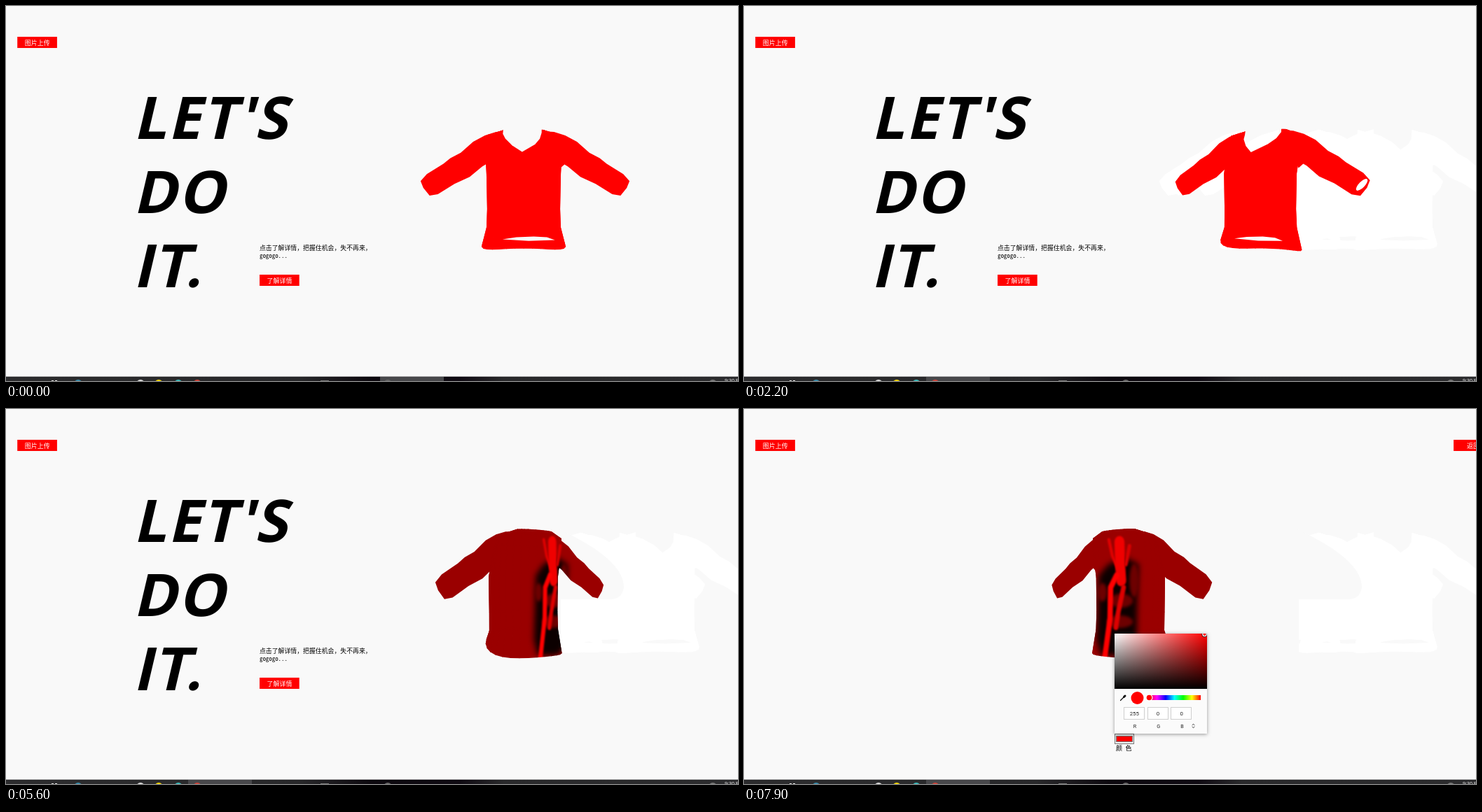
Recreate the animation shown at these times as an HTML page with a canvas. Size 1045 px wide and 536 px high, loop 8 s.

```html
<!DOCTYPE html>
<html lang="zh">
<head>
<meta charset="utf-8">
<title>Let's do it</title>
<style>
html, body { margin: 0; width: 100%; height: 100%; overflow: hidden; background: #f9f9f9; }
canvas { display: block; }
</style>
</head>
<body>
<canvas id="stage" width="1045" height="536"></canvas>
<script>
const W = 1045, H = 536, LOOP = 8000, STEP = 100;
const RED = '#f00', PAGE = '#f9f9f9';
const KAI = '"Noto Sans Mono CJK SC", "Noto Sans CJK SC", "Noto Sans CJK", sans-serif';
const UI = '"Noto Sans", "Noto Sans CJK SC", "Noto Sans CJK", sans-serif';
const g = document.getElementById('stage').getContext('2d');
const layer = document.createElement('canvas');
layer.width = W;
layer.height = H;
const s = layer.getContext('2d');

function rect(x, y, w, h, fill, line) {
  g.fillStyle = fill;
  g.fillRect(x, y, w, h);
  if (line) {
    g.strokeStyle = line;
    g.lineWidth = 1;
    g.strokeRect(x + 0.5, y + 0.5, w - 1, h - 1);
  }
}

function disc(x, y, r, fill) {
  g.fillStyle = fill;
  g.beginPath();
  g.arc(x, y, r, 0, 7);
  g.fill();
}

function text(str, x, y, size, fill = '#000', align = 'left', family = UI) {
  g.font = `${size}px ${family}`;
  g.textAlign = align;
  g.fillStyle = fill;
  g.fillText(str, x, y);
}

function button(str, x, y, fill = RED) {
  rect(x, y, 56.7, 16, fill);
  text(str, x + 28.5, y + 11.5, 9, '#fff', 'center', KAI);
}

/* ---- shirt: rings for the body, a flat outline for each sleeve ---- */
// y, half width, half depth, depth offset
const rings = [
  [176, 30, 11, -19], [184, 52, 25, -11], [200, 55, 33, -6], [240, 52, 44, 6],
  [290, 51, 44, 6], [316, 52, 43, 5], [0, 59, 45, 4]
];
const sleeve = [
  [26, 178], [42, 179], [58, 184], [75, 193], [93, 209], [108, 217], [118, 225], [142, 240],
  [151, 250], [147, 260], [138, 271], [126, 269], [102, 254], [80, 244], [62, 229],
  [57, 226], [50, 232]
];

function project(cx, a, x, y, z) {
  const depth = x * Math.sin(a) + z * Math.cos(a);
  const p = 800 / (800 - depth);
  return [cx + (x * Math.cos(a) - z * Math.sin(a)) * p, 265 + (y - 265) * p];
}

function poly(pts) {
  s.beginPath();
  for (const p of pts) s.lineTo(p[0], p[1]);
  s.closePath();
  s.fill();
}

function ringPoint([y, rx, rz, z0], k) {
  const b = k * Math.PI / 14;
  const z = z0 + rz * Math.sin(b);
  return [rx * Math.cos(b) - 2, y || 345 - 0.33 * z - 0.005 * z * z, z];
}

function curve(pts, width, color) {
  s.strokeStyle = color;
  s.lineWidth = width;
  s.beginPath();
  for (const p of pts) s.lineTo(p[0], p[1]);
  s.stroke();
}

// dark armchair with a bright red silhouette
function print(cx, a) {
  s.save();
  s.globalCompositeOperation = 'source-atop';
  s.translate(cx - 15 * Math.cos(a) + 38 * Math.sin(a), 0);
  s.scale(Math.cos(a - 3.3), 1);
  s.lineCap = 'round';
  s.filter = 'blur(4px)';
  s.fillStyle = '#0c0000';
  poly([[-30, 238], [-14, 222], [14, 212], [38, 222], [36, 250], [34, 340], [16, 352], [-26, 352], [-34, 330]]);
  s.filter = 'blur(2px)';
  s.fillStyle = '#6d0000';
  for (const [x, y, rx, ry] of [[-24, 262, 8, 13], [8, 274, 20, 10], [6, 304, 22, 9], [30, 245, 8, 24]]) {
    s.beginPath();
    s.ellipse(x, y, rx, ry, 0, 0, 7);
    s.fill();
  }
  s.filter = 'blur(0.8px)';
  curve([[-13, 187], [-7, 210], [2, 228]], 5, '#e00000');
  curve([[5, 190], [6, 220], [8, 245]], 17, '#f00000');
  curve([[22, 196], [16, 222]], 6, '#d80000');
  curve([[12, 255], [3, 290], [-1, 312]], 8, '#dd0000');
  curve([[0, 238], [-10, 255], [-11, 300], [-20, 355]], 9, RED);
  s.restore();
}

function shirt(cx, a, color, printed) {
  s.clearRect(0, 0, W, H);
  s.fillStyle = s.strokeStyle = color;
  s.lineWidth = 1.4;
  s.lineJoin = 'round';
  const at = p => project(cx, a, ...p);
  for (const side of [-1, 1])
    poly(sleeve.map(([x, y]) => at([x * side, y, -10])));
  for (let i = 0; i + 1 < rings.length; i++)
    for (let k = 0; k < 28; k++) {
      poly([[i, k], [i, k + 1], [i + 1, k + 1], [i + 1, k]]
        .map(([r, n]) => at(ringPoint(rings[r], n))));
      s.stroke();
    }
  if (printed) print(cx, a);
  if (Math.cos(a) > 0.15) {
    s.globalCompositeOperation = 'destination-out';
    poly([[-31, 168, -10], [-32, 182, -8], [-28, 190, 5], [-18, 201, 20], [-4, 211, 34],
      [14, 199, 16], [21, 190, 2], [24, 180, -10], [24, 168, -10]].map(at));
    if (Math.cos(a) > 0.5)
      poly([[-31, 331, 30], [-12, 328, 30], [12, 327, 30], [30, 328, 30], [41, 332, 30], [5, 333, 30]].map(at));
    if (a > 0.2 && a < 1.1) {
      const [x, y] = at([140, 256, -10]);
      s.beginPath();
      s.ellipse(x, y, 11, 11 * Math.sin(a), -0.8, 0, 7);
      s.fill();
    }
    s.globalCompositeOperation = 'source-over';
  }
  g.drawImage(layer, 0, 0);
}

/* ---- page ---- */
function headline(str, y, font) {
  g.save();
  g.font = font;
  g.textAlign = 'left';
  g.letterSpacing = '2px';
  g.translate(188, y);
  g.transform(1, 0, -0.235, 1, 0, 0);
  g.fillText(str, g.measureText(str).actualBoundingBoxLeft, 0);
  g.restore();
}

function copy(dx, fill = '#000', red = RED) {
  g.save();
  g.translate(dx, 0);
  g.fillStyle = fill;
  headline("LET'S", 190, '700 84px "Open Sans", "Noto Sans", sans-serif');
  headline('DO', 296, '700 84px "Open Sans", "Noto Sans", sans-serif');
  headline('IT.', 402, '800 84px Lato, sans-serif');
  text('点击了解详情，把握住机会，失不再来，', 362, 349, 8.9, fill, 'left', KAI);
  text('gogogo...', 362, 359.5, 8.9, fill, 'left', KAI);
  button('了解详情', 362, 384, red);
  g.restore();
}

function taskbar(t) {
  const tone = g.createLinearGradient(0, 0, W, 0);
  [[0, '#2c2c2e'], [0.4, '#28282a'], [0.5, '#0c080e'], [0.62, '#0f0a12'], [0.68, '#29292b'], [1, '#2c2c2e']]
    .forEach(([p, c]) => tone.addColorStop(p, c));
  rect(0, 529.7, W, 6.3, tone);
  rect(t < 500 ? 534 : 260, 530, 91, 6, '#48484b');
  for (const [x, c] of [[103, '#3b8fae'], [192, '#ddd'], [218, '#f5d90a'], [246, '#3dbfc0'], [273, '#d0453b'], [545, '#666'], [1009, '#777']])
    disc(x, 540, 6, c);
  rect(65, 535, 3, 1, '#eee');
  rect(70, 535, 3, 1, '#eee');
  rect(449, 535, 12, 1, '#777');
  text('9:30 F', 1026, 538, 7, '#eee');
}

/* ---- file dialog ---- */
const files = `06e462c5d4bd 405d9ba77de7f 399f046.jpg|9fdab7ba35794 1249a382262d b5464b7.jpg
22b8e23dddcd 451da40a94660 e111ebb.jpg|43fd3e880e304 4da9ac812c6b7 d545bf.png
58e68eee2de24 264bcc7b63c33 29341c.jpg|079fea883cb54 288b39e56303e 080813.png
786c15d3f93b4 511b27f50a73d e1a83f.jpg|6894b43d8465 4143b0d2e9e9 46bac062.jpg
3317414ce0b24 5babe57fc2e28 45b942.jpg|a57adb51de7f4 60c9f8aa3b6b2 ddf974.png
a91f2672a0a64 cb195a809789e 517f60.jpg|a1485290354e4 2ad91456cbd8f 755acf.png
a236998063604 f949af104f4337 e51b6.jpg|cda7431775ca4 4d48c0bc4b2df ce41cb.png
cec99a4688041 1ebb6edd017c2 d2eca2.png|d8646cbc587a4 69c97c0302c89 8a1598.jpg
fe54d0da5a884 892aa9766a8c8 3ef5a8.jpg|logo.png`.split(/[|\n]/);
// background and figure colour of each thumbnail
const thumbs = `fff:544 060b14:567 d2a878:2a6f96 fff:555 fff:323040 3c3c3c:111 050505:555 fff:3b2026 fff:334 f4f4f4:aab
e8d6b8:3a2a22 ecd9da:d88 fff:223 2b2b2b:444 4c83b3:123a5c 0b0d0b:454 fff:9a8fc4`.split(/\s+/);

function thumb(i, x, y) {
  const [back, fig] = thumbs[i].split(':').map(c => '#' + c);
  rect(x - 26, y, 52, 29, back, '#d4d4d4');
  if (i === 2) rect(x - 25, y + 1, 50, 9, '#5f7c9c');
  const fx = i === 14 ? x + 17 : i === 11 ? x - 17 : i === 9 ? x + 4 : x;
  disc(fx, y + 8, 4.5, fig);
  g.beginPath();
  g.moveTo(fx - 3, y + 11);
  g.lineTo(fx + 3, y + 11);
  g.lineTo(fx + 8, y + 28);
  g.lineTo(fx - 8, y + 28);
  g.fill();
}

function fileGrid(t) {
  files.forEach((name, i) => {
    const x = 131.5 + 60.6 * (i % 10), low = i > 9;
    if (i === 14 && t >= 3900) rect(x - 29, 86, 60, 86, '#cce8ff', '#99d1ff');
    if (i === 17) {
      rect(x - 26, 88, 50, 51, '#fff', '#ddd');
      disc(x - 1, 113, 22, '#e8453c');
    } else thumb(i, x, low ? 110 : 24);
    name.split(' ').forEach((line, n) =>
      text(line, x, (low ? 149 : 62.5) + 9.7 * n, 7.3, '#111', 'center'));
  });
}

function dialog(t) {
  g.save();
  if (t < 2800) {
    g.globalAlpha = 0.6;
    g.translate(358, 100);
    g.scale(0.95, 0.95);
    g.translate(-358, -100);
  }
  g.shadowColor = 'rgba(0,0,0,.35)';
  g.shadowBlur = 9;
  g.shadowOffsetY = 2;
  rect(4, -8, 709, 250, '#fcfcfc');
  g.shadowColor = 'transparent';
  rect(4, 197, 709, 45, '#f0f0f0');
  rect(4, 50, 88, 14, '#d9d9d9');
  const places = [['快速访问', 29, 14, '#2f86d8'], ['此电脑', 29, 33, '#2f9be0'], ['本地磁盘 (C:)', 34, 46, '#555'],
    ['软件 (D:)', 34, 60, '#555'], ['文档 (E:)', 34, 74, '#555'], ['网络', 29, 91, '#2f86d8']];
  for (const [name, x, y, c] of places) {
    text(name, x, y, 7.3);
    if (x > 30) rect(x - 11, y - 3, 8, 3, c);
    else rect(x - 11, y - 6, 8, 6, c);
  }
  if (t >= 2900) fileGrid(t);
  text('文件名(N):', 110, 213, 7.3, '#111', 'right');
  rect(112, 203, 478, 14, '#fff', '#8a8a8a');
  if (t >= 3900) text('cec99a46880411ebb6edd017c2d2eca2.png', 114.5, 213, 7.3);
  rect(597, 203, 106, 14, '#e4e4e4', '#adadad');
  text('所有文件 (*.*)', 599, 213, 7.3);
  g.strokeStyle = '#555';
  for (const x of [585, 698]) {
    g.beginPath();
    g.moveTo(x - 2.5, 209);
    g.lineTo(x, 211.5);
    g.lineTo(x + 2.5, 209);
    g.stroke();
  }
  rect(597, 221, 49, 14, '#e1e1e1', '#0078d7');
  text('打开(O)', 621.5, 230.5, 7.3, '#111', 'center');
  rect(654, 221, 49, 14, '#e1e1e1', '#adadad');
  text('取消', 678.5, 230.5, 7.3, '#111', 'center');
  g.strokeStyle = '#4a97d2';
  g.strokeRect(3.5, -8, 709.5, 250);
  g.restore();
}

/* ---- colour input and picker ---- */
function blend(x0, y0, x1, y1, ...colors) {
  const f = g.createLinearGradient(x0, y0, x1, y1);
  colors.forEach((c, i) => f.addColorStop(i / (colors.length - 1), c));
  return f;
}

function colorInput() {
  rect(529, 464, 28, 15, '#efefef', '#767676');
  rect(531, 467, 24, 9, RED, '#777');
  text('颜 色', 531, 488, 9, '#000', 'left', KAI);
}

function picker() {
  g.save();
  g.shadowColor = 'rgba(0,0,0,.4)';
  g.shadowBlur = 5;
  g.shadowOffsetY = 1;
  rect(529, 321, 132, 143, '#fbfbfb');
  g.restore();
  rect(529, 321, 132, 79, blend(529, 0, 661, 0, '#fff', RED));
  rect(529, 321, 132, 79, blend(0, 321, 0, 400, 'rgba(0,0,0,0)', '#000'));
  g.save();
  g.beginPath();
  g.rect(529, 321, 132, 79);
  g.clip();
  disc(657.5, 322, 4, '#111');
  disc(657.5, 322, 3.2, '#fff');
  disc(657.5, 322, 2, RED);
  g.restore();
  g.strokeStyle = '#111';
  g.lineCap = 'round';
  g.lineWidth = 1.2;
  g.beginPath();
  g.moveTo(537.5, 416.5);
  g.lineTo(543, 411);
  g.stroke();
  g.lineWidth = 3;
  g.beginPath();
  g.moveTo(542.5, 411.5);
  g.lineTo(544, 410);
  g.stroke();
  g.lineCap = 'butt';
  disc(561.5, 413, 9, RED);
  rect(577, 409, 75, 7, blend(577, 0, 652, 0, RED, '#f0f', '#00f', '#0ff', '#0f0', '#ff0', RED));
  disc(578.5, 412.5, 5, '#fff');
  disc(578.5, 412.5, 3.8, RED);
  [['R', '255'], ['G', '0'], ['B', '0']].forEach(([name, value], i) => {
    const x = 542 + 33.7 * i;
    rect(Math.round(x), 426, 30, 18, '#fff', '#cfcfcf');
    text(value, x + 15.2, 438, 7.8, '#222', 'center', 'Roboto, sans-serif');
    text(name, x + 16, 456, 7.2, '#222', 'center', 'Roboto, sans-serif');
  });
  g.strokeStyle = '#222';
  g.lineWidth = 0.9;
  for (const d of [-1, 1]) {
    g.beginPath();
    g.moveTo(639.7, 453 + d);
    g.lineTo(641.5, 453 + d * 2.6);
    g.lineTo(643.3, 453 + d);
    g.stroke();
  }
}

/* ---- timeline ---- */
const RELOAD = 600, SETTLED = 1730, CENTER = 741;
const turn = t => (t < RELOAD ? t : t - 1560) / 1000 * 35 * Math.PI / 180;
const entry = t => Math.max(0, (SETTLED - t) / 100) ** 2;
const leave = t => {
  const p = Math.min(1, Math.max(0, (t - 6850) / 600));
  return p * p * (3 - 2 * p);
};

// white marks left where things have been
function traces(t) {
  if (t >= RELOAD && t < 2800) {
    shirt(CENTER, 0.02, '#fff');
    shirt(CENTER, 0.3, '#fff');
  }
  if (t >= RELOAD && t < 1600) copy(0, '#fff', '#fff');
  for (const at of [1300, 1400, 1500])
    if (t > at) shirt(CENTER + 10.3 * entry(at), turn(at), '#fff');
  if (t >= 2800) {
    rect(580, 165, 212, 200, PAGE);
    g.beginPath();
    g.moveTo(790, 172);
    g.quadraticCurveTo(882, 215, 882, 255);
    g.quadraticCurveTo(880, 270, 865, 272);
    g.lineTo(790, 272);
    g.fill();
  }
}

function draw(t) {
  rect(0, 0, W, H, PAGE);
  traces(t);
  const out = leave(t);
  if (t < RELOAD) {
    copy(0);
    shirt(CENTER, turn(t), RED);
  } else {
    if (t >= 800 && out < 1) copy(-6.42 * entry(t) - 560 * out);
    if (t >= 1200) {
      const printed = t >= 4900;
      shirt(CENTER + 10.3 * entry(t) - 195 * out, turn(t), printed ? '#9a0000' : RED, printed);
    }
  }
  button('图片上传', 16.2, 44);
  if (t >= 7400) {
    rect(1013, 44, 57, 16, RED);
    text('返回', 1032, 55.5, 9, '#fff', 'left', KAI);
  }
  if (t >= 7100) colorInput();
  if (t >= 7600) picker();
  if (t >= 2700 && t < 4700) dialog(t);
  taskbar(t);
}

let shown = -1;
function frame(now) {
  const t = Math.floor(now % LOOP / STEP) * STEP;
  if (t !== shown) draw(shown = t);
  requestAnimationFrame(frame);
}
requestAnimationFrame(frame);
</script>
</body>
</html>
```
